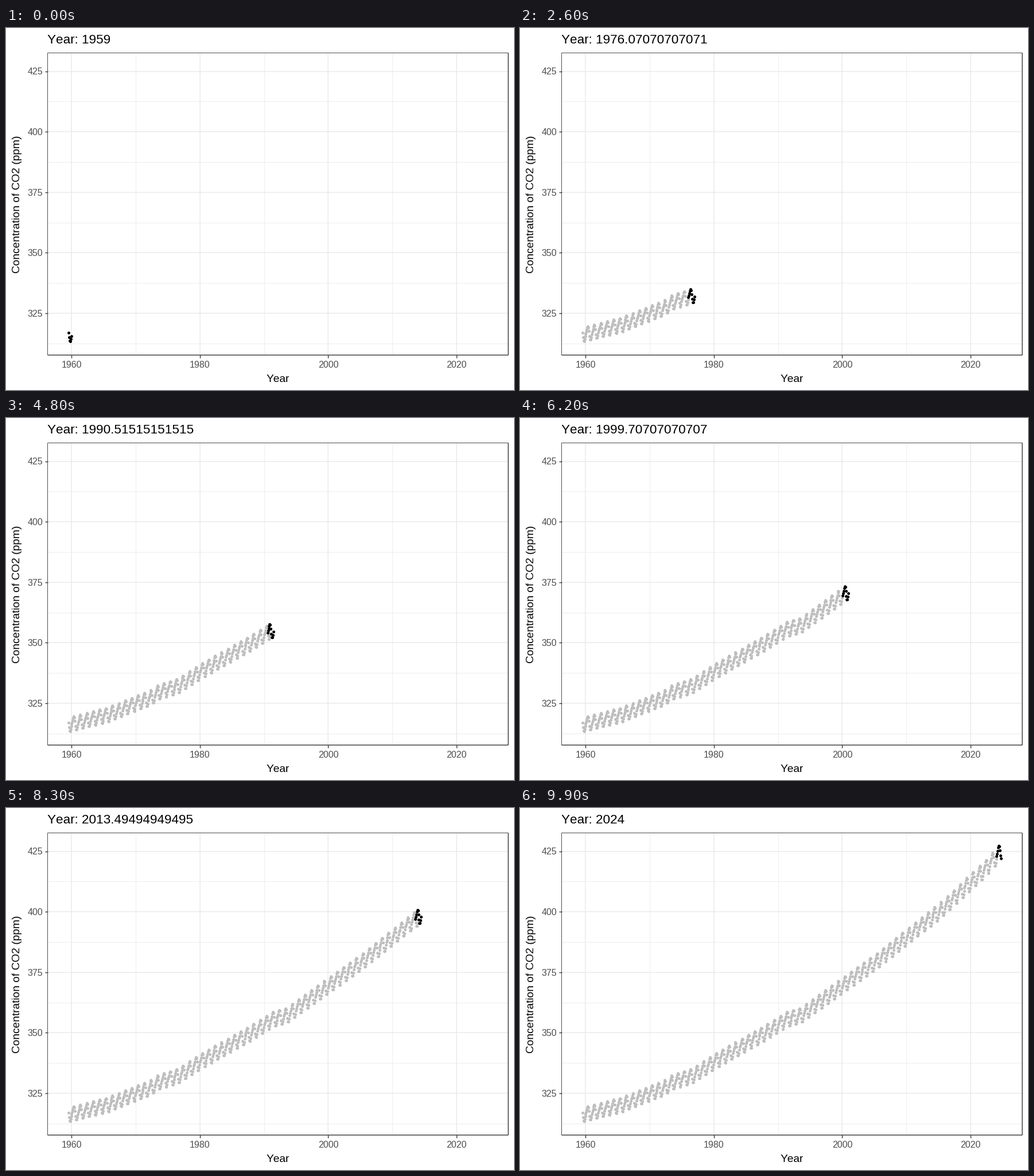
A matplotlib script for the animation above (10 s loop, 885 by 632 pixels).

```python
import matplotlib.pyplot as plt
import numpy as np
from matplotlib.animation import FuncAnimation

W, H, DPI = 885, 632, 100
PX = 72 / DPI
LEFT, TOP, RIGHT, BOTTOM = 72.5, 43.5, 875, 571
FRAMES, FIRST, LAST = 100, 1959, 2024
GRID, INK, TICK_TEXT = "#EBEBEB", "#333333", "#4D4D4D"
plt.rcParams["font.family"] = "Liberation Sans"
plt.rcParams["text.kerning_factor"] = 6  # practically no pair kerning

# Bends of the long-term trend: year, ppm
TREND = np.array([(1959.5, 316.2), (1965.5, 320.2), (1972.5, 327.6),
                  (1973.5, 329.6), (1976.5, 332.1), (1980.5, 338.8),
                  (1987.5, 349.3), (1991.5, 355.8), (1993.5, 357.2),
                  (1998.5, 366.7), (2005.5, 380.0), (2015.5, 401.1),
                  (2022.5, 418.5), (2024.7, 425.1)])


def px(year):
    return 114.0 + 11.187 * (np.asarray(year) - 1960)


def py(ppm):
    return 498.0 - 4.2245 * (np.asarray(ppm) - 325)


def co2(t):
    """Trend plus a two-harmonic seasonal cycle that slowly widens."""
    a = 2 * np.pi * t
    season = (2.56 * np.sin(a) - 1.10 * np.cos(a)
              - 0.39 * np.sin(2 * a) + 0.65 * np.cos(2 * a))
    swing = 0.94 + 0.13 * (t - FIRST) / (LAST - FIRST)
    return np.interp(t, *TREND.T) + swing * season


def months(year):
    """Pixel positions of a year's monthly readings, July 1959 to September 2024."""
    t = year + (np.arange(12) + 0.5) / 12
    t = t[(t > 1959.5) & (t < 2024.75)]
    return np.column_stack([px(t), py(co2(t))])


DATA = [months(year) for year in range(FIRST, LAST + 1)]
KEYS = np.round(np.arange(len(DATA)) * (FRAMES - 1) / (LAST - FIRST)).astype(int)

fig = plt.figure(figsize=(W / DPI, H / DPI), dpi=DPI, facecolor="white")
ax = fig.add_axes([0, 0, 1, 1])
ax.set(xlim=(0, W), ylim=(H, 0))
ax.axis("off")


def line(x0, y0, x1, y1, color, width, **kw):
    ax.plot([x0, x1], [y0, y1], color=color, lw=width * PX,
            solid_capstyle="butt", **kw)


def label(x, y, s, size, color="black", ha="center", **kw):
    return ax.text(x, y, s, fontsize=size * PX, color=color, ha=ha,
                   va="baseline", **kw)


def dots(color, z):
    return ax.plot([], [], "o", color=color, ms=5.0 * PX, mew=0, zorder=z)[0]


for year in (1970, 1990, 2010):
    line(px(year), TOP, px(year), BOTTOM, GRID, 0.9)
for ppm in np.arange(312.5, 420, 25):
    line(LEFT, py(ppm), RIGHT, py(ppm), GRID, 0.9)
for year in range(1960, 2021, 20):
    x = px(year)
    line(x, TOP, x, BOTTOM, GRID, 1.5)
    line(x, BOTTOM, x, BOTTOM + 4.6, INK, 1.4)
    label(x, 593, str(year), 16, TICK_TEXT)
for ppm in range(325, 426, 25):
    y = py(ppm)
    line(LEFT, y, RIGHT, y, GRID, 1.5)
    line(LEFT - 4.6, y, LEFT, y, INK, 1.4)
    label(64.3, y + 5.8, str(ppm), 16, TICK_TEXT, "right")

edge = dict(zorder=5, snap=False)
line(LEFT, TOP, LEFT, BOTTOM, "#4D4D4D", 1, **edge)
line(LEFT, TOP, RIGHT, TOP, "#4D4D4D", 1, **edge)
line(RIGHT, TOP, RIGHT, BOTTOM, INK, 1.4, **edge)
line(LEFT, BOTTOM, RIGHT, BOTTOM, INK, 1.4, **edge)

label(474, 617.5, "Year", 19.1)
label(24.5, 308, "Concentration of CO2 (ppm)", 19.1, rotation=90,
      rotation_mode="anchor")
title = label(72.5, 27, "", 22.5, ha="left")
past = dots("#BEBEBE", 3)
now = dots("black", 4)


def current(i):
    """Points of the year at step i, or a blend of its two neighbours."""
    k = np.searchsorted(KEYS, i, side="right") - 1
    if KEYS[k] == i:
        return DATA[k]
    f = (i - KEYS[k]) / (KEYS[k + 1] - KEYS[k])
    n = min(len(DATA[k]), len(DATA[k + 1]))
    return (1 - f) * DATA[k][:n] + f * DATA[k + 1][:n]


def update(i):
    title.set_text(f"Year: {FIRST + (LAST - FIRST) * i / (FRAMES - 1):.15g}")
    done = np.searchsorted(KEYS, i)
    past.set_data(*(np.vstack(DATA[:done]).T if done else ([], [])))
    now.set_data(*current(i).T)
    return title, past, now


anim = FuncAnimation(fig, update, frames=FRAMES, interval=100, repeat=True,
                     repeat_delay=0, blit=False)
plt.show()
```
